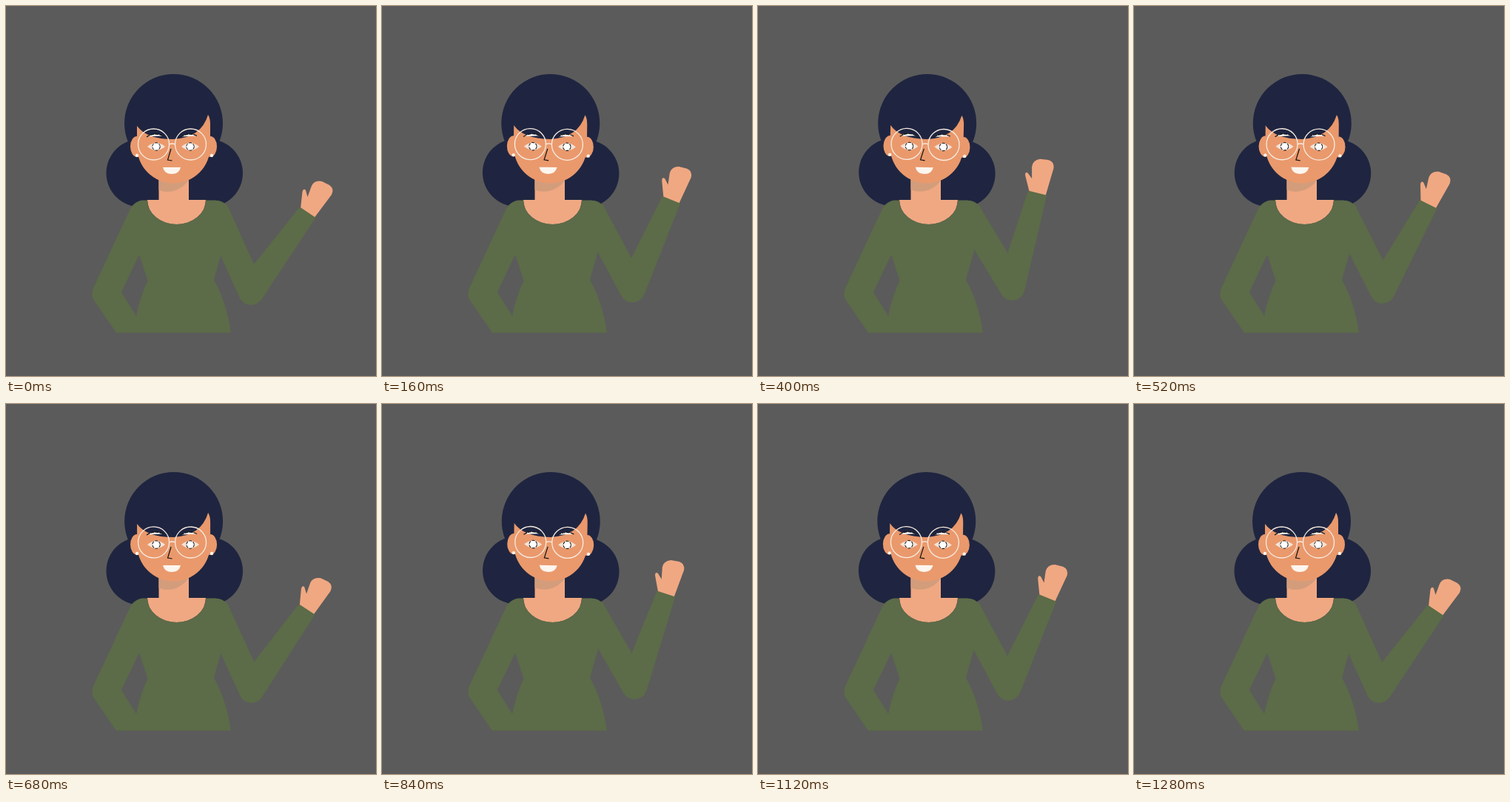
Animation, 500 px wide and 500 px high, one loop 1.32 s. Source, as an HTML page:

```html
<!DOCTYPE html>
<html lang="en">
<head>
<meta charset="utf-8">
<title>Waving woman</title>
<style>
  html, body { margin: 0; height: 100%; overflow: hidden; background: #5b5b5b; }
  svg { display: block; width: 100%; height: 100%; }
  .hair { fill: #1f2540; }
  .face { fill: #ea996c; }
  .skin { fill: #f0a882; }
  .knit { fill: #5c6b48; }
  .white { fill: #fdf6ef; }
  .line { fill: none; stroke: #111; stroke-width: 1.2; }
  .frame { fill: none; stroke: #f8ece2; stroke-width: 1.3; }
</style>
</head>
<body>
<svg viewBox="0 0 500 500">
  <defs>
    <clipPath id="neck"><path d="M206.5 220H247V262H206.5Z"/></clipPath>
    <g id="eye">
      <path d="M-12 0Q-6 -5 0 -5T12 0Q6 5 0 5T-12 0Z" fill="#f6e2d5"/>
      <circle r="5.2" fill="#fff" stroke="#111" stroke-dasharray="4 1.5"/>
      <path d="M-13 -13.5Q-2 -20 9 -14.5L-2 -14Z" fill="#fff"/>
      <path class="line" d="M-13 -13Q-2 -20 9 -14.5" stroke-dasharray="5 1"/>
    </g>
  </defs>

  <g class="head">
    <rect class="hair" x="135.5" y="180" width="184.5" height="91.5" rx="45.7"/>
  </g>

  <path class="skin" d="M206.5 220H247V262H270A39.5 33 0 0 1 191 262H206.5Z"/>
  <g clip-path="url(#neck)">
    <g class="head"><circle cx="218" cy="217" r="34" fill="#d39d7c"/></g>
  </g>

  <path class="knit" fill-rule="evenodd" d="M191 262.5A39.5 32.5 0 0 0 270 262.5H282Q296 263 301 273L304 289L281 370
    Q298 400 304 441.5H149L119 398Q114 390 118 381L167 276Q173 263 186 262.5Z
    M180 336L156 386.5L176 419Q181 393 191.5 371Z"/>

  <g class="head">
    <circle class="hair" cx="226.5" cy="158.5" r="66.5"/>
    <g class="face">
      <ellipse cx="177" cy="190" rx="9" ry="14"/>
      <ellipse cx="276" cy="190" rx="9" ry="14"/>
      <path d="M177 162Q190 180 226 180Q264 178 273 147Q276 151 276 160V190A49.5 49.5 0 0 1 177 190Z"/>
    </g>
    <circle class="white" cx="177" cy="202" r="2.2"/>
    <circle class="white" cx="278" cy="202" r="2.2"/>
    <use href="#eye" x="203" y="190"/>
    <use href="#eye" x="249" y="190"/>
    <g class="frame">
      <circle cx="199.5" cy="187" r="21"/>
      <circle cx="249.5" cy="187" r="21"/>
      <path d="M220.5 187Q224.5 185 228.5 187"/>
    </g>
    <path class="line" d="M223 193L218.5 208L224.5 209"/>
    <path class="white" d="M212 218H236Q234 227 224 227T212 218Z"/>
  </g>

  <g id="arm">
    <path class="knit" d="M270 293L300 271L345 371L346.5 380L331 387L315.5 394Z"/>
    <circle class="knit" cx="331" cy="387" r="17"/>
    <g id="forearm">
      <path class="skin" d="M398 274L400.5 251Q402 245.500 405 249L407.500 258L413 243Q417 235 427 237L437 242Q444 247 440 255L416 287Z"/>
      <path class="knit" d="M397 271.500L418.500 286L345 397L331 387L315 374Z"/>
    </g>
  </g>
</svg>
<script>
  const LOOP = 1320, STEP = 40, WAVE = 640;
  const heads = document.querySelectorAll('.head');
  const arm = document.getElementById('arm');
  const forearm = document.getElementById('forearm');
  const turn = (node, angle, x, y) =>
    node.setAttribute('transform', `rotate(${angle} ${x} ${y})`);

  // Two waves per loop, then a one-step rest with the arm out.
  function draw(now) {
    const time = Math.floor(now % LOOP / STEP) * STEP;
    const swing = Math.sin(Math.PI * time / WAVE) ** 2;
    heads.forEach(node => turn(node, 1.5 * swing, 228, 255));
    turn(arm, -8.1 * swing, 286, 281);
    turn(forearm, -15.8 * swing, 331, 387);
  }

  const start = performance.now();
  function tick() {
    draw(performance.now() - start);
    requestAnimationFrame(tick);
  }
  tick();
</script>
</body>
</html>
```
